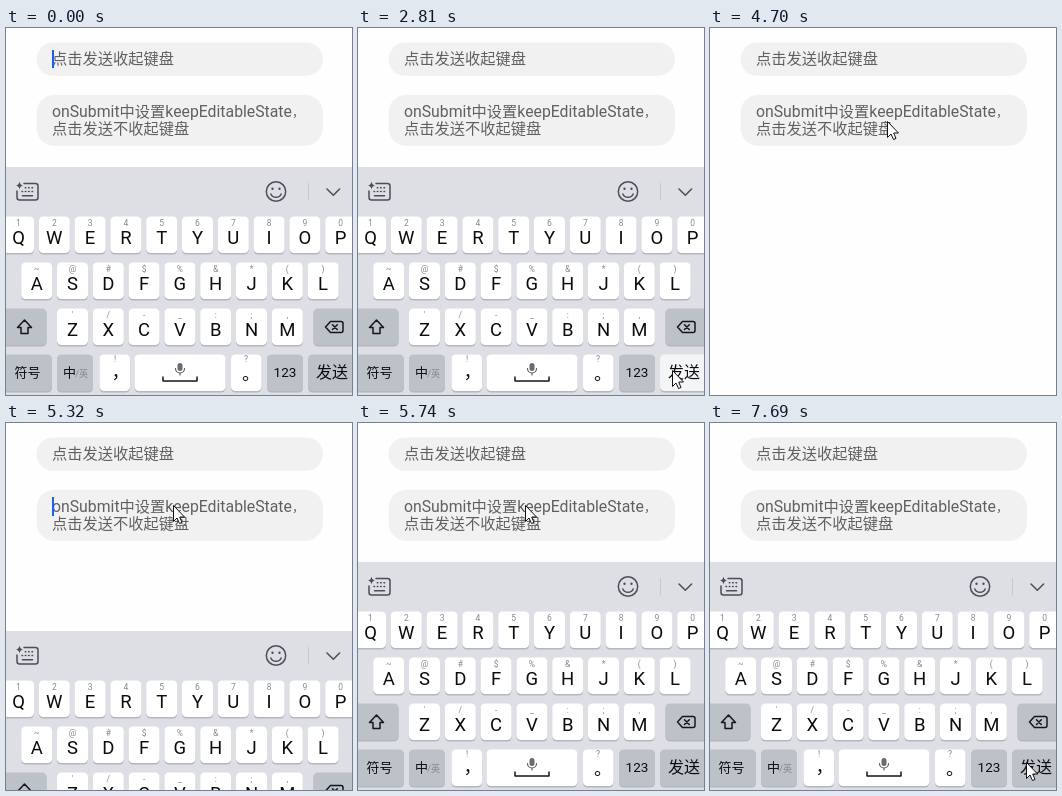
These frames come from a looping animation (346x367 px, 8 s). An HTML page:

```html
<!DOCTYPE html>
<html lang="zh-CN">
<head>
<meta charset="utf-8">
<title>Keyboard submit</title>
<style>
  html, body { margin: 0; width: 100%; height: 100%; overflow: hidden; background: #fefefe; }
  svg { display: block; width: 346px; height: 367px; }
  text { font-family: Roboto, "Noto Sans CJK SC", "Noto Sans CJK", sans-serif; fill: #0c0c0e; }
  .field { fill: #f1f1f1; }
  .hint { font-size: 15.25px; fill: #606060; }
  .latin { font-size: 15.8px; }
  .caret { fill: #1a5ff5; }
  .edge { fill: #b3b7bf; }
  .key { fill: #fff; }
  .dark { fill: #bdc1c8; }
  .pressed { fill: #f4f5f7; }
  .letter { font-size: 18.5px; text-anchor: middle; }
  .small { font-size: 8.5px; fill: #85888e; text-anchor: middle; }
  .word { font-size: 13px; font-weight: 500; text-anchor: middle; }
  .plain { font-weight: 400; }
  .line { fill: none; stroke: #4b4e54; stroke-width: 1.5; stroke-linecap: round; stroke-linejoin: round; }
  .ink { stroke: #16171a; }
</style>
</head>
<body>
<svg viewBox="0 0 346 367">
  <rect class="field" x="30.5" y="14.6" width="286.5" height="33.2" rx="16.6"/>
  <rect class="field" x="30.5" y="66.8" width="286.5" height="51" rx="18"/>
  <text class="hint" x="46" y="35.7">点击发送收起键盘</text>
  <text class="hint" x="46" y="88.5"><tspan class="latin">onSubmit</tspan>中设置<tspan class="latin">keepEditableState</tspan><tspan font-size="12">，</tspan></text>
  <text class="hint" x="46" y="105.7">点击发送不收起键盘</text>
  <rect class="caret" id="caret1" x="46" y="22" width="2" height="18"/>
  <rect class="caret" id="caret2" x="46" y="74" width="2" height="19"/>

  <g id="keyboard">
    <rect y="139" width="346" height="230" fill="#dddfe5"/>
    <g class="line">
      <path d="M18 155.5H29.5Q32 155.5 32 158V169.5Q32 172 29.5 172H13.5Q11 172 11 169.5V163"/>
      <path d="M16.5 167.7H26.5M16 163.5h.6M19.3 163.5h.6M22.6 163.5h.6M26 163.5h.6M19.3 159.7h.6M22.6 159.7h.6M26 159.7h.6"/>
      <path d="M13.5 153.5Q14 157 17 157.5Q14 158 13.5 161.5Q13 158 10 157.5Q13 157 13.5 153.5Z" fill="#4b4e54" stroke="none"/>
      <circle cx="270" cy="163.5" r="9.7"/>
      <path d="M264.8 166Q266.3 169.3 270 169.3T275.2 166"/>
      <path d="M266.5 160.5v.4M273.5 160.5v.4" stroke-width="2.2"/>
      <path d="M302.5 155.5V172" stroke="#c6c9d0" stroke-width="1"/>
      <path d="M321 161L327.3 167.3L333.6 161"/>
    </g>
    <g id="keys"></g>
    <g class="line ink">
      <path d="M18.5 292L25.5 299.5H22V305.5H15V299.5H11.5Z"/>
      <path d="M324.5 293.5H335Q337 293.5 337 295.5V302.5Q337 304.5 335 304.5H324.5L319.5 299Z"/>
      <path d="M326.5 296.7L331.3 301.5M331.3 296.7L326.5 301.5"/>
      <path d="M157 348.5V353H191V348.5" stroke-linecap="butt"/>
    </g>
    <rect x="171.5" y="335" width="5" height="8" rx="2.5" fill="#686b70"/>
    <path class="line" d="M169.5 340.5a4.5 4.5 0 0 0 9 0M174 345v2" style="stroke-width:1.1"/>
    <text class="word" x="21.5" y="349">符号</text>
    <text class="word" x="63.5" y="349">中</text>
    <text class="small" x="75.7" y="348.5" style="font-size:9px">/英</text>
    <text class="small" x="109" y="334">!</text>
    <text x="105.5" y="349.5" font-size="18">，</text>
    <text class="small" x="240" y="334">?</text>
    <text x="236" y="351.5" font-size="18">。</text>
    <text class="word plain" x="279" y="349" style="font-size:13.5px">123</text>
    <text class="word plain" x="326" y="350" style="font-size:16px">发送</text>
  </g>

  <path id="cursor" d="M.5 .5V16.5L4 13L6.5 18.5L9 17.5L6.7 12H11.5Z" fill="#fff" stroke="#111" stroke-linejoin="round"/>
</svg>
<script>
const LOOP = 8000, STEP = 69, PITCH = 35.8, KEYBOARD_H = 228;
const $ = id => document.getElementById(id);

const key = (x, y, w, cls = 'key', id = '') =>
  `<rect class="edge" x="${x}" y="${y + 1}" width="${w}" height="37" rx="4.5"/>
   <rect class="${cls}" ${id && `id="${id}"`} x="${x}" y="${y}" width="${w}" height="36.5" rx="4.5"/>`;

const esc = c => c === '&' ? '&amp;' : c;

// A row of letter keys, each with its small alternate character.
const row = (letters, marks, x0, y) => [...letters].map((c, i) => {
  const x = x0 + i * PITCH;
  return key(x - 15.5, y, 31) +
    `<text class="small" x="${x}" y="${y + 9}">${esc(marks[i])}</text>
     <text class="letter" x="${x}" y="${y + 27.5}">${c}</text>`;
}).join('');

$('keys').innerHTML =
  row('QWERTYUIOP', '1234567890', 12.5, 188.5) +
  row('ASDFGHJKL', '~@#$%&*()', 30.7, 234.5) +
  row('ZXCVBNM', "'/-_:;,", 66.5, 280.5) +
  key(-6, 280.5, 46.5, 'dark') + key(307.5, 280.5, 46, 'dark') +
  key(-6, 326.5, 52, 'dark') + key(51, 326.5, 36, 'dark') +
  key(93.5, 326.5, 30.5) + key(128.5, 326.5, 91) + key(225, 326.5, 30.5) +
  key(261, 326.5, 36, 'dark') + key(302, 326.5, 50, 'dark', 'send');

const within = (t, spans) => spans.some(([a, b]) => t >= a && t < b);
const smooth = p => p * p * (3 - 2 * p);
const linear = p => p;
const held = (t, start) => Math.floor((t - start) / STEP) * STEP;

// start, end, from, to, easing
const moves = [
  [601, 800, [306, 368], [314, 344], linear],
  [931, 1069, [314, 344], [314, 342], linear],
  [4000, 4694, [314, 342], [177, 93], smooth],
  [4694, 4900, [177, 93], [167, 82], linear],
  [6002, 6830, [167, 82], [312, 334], smooth],
  [6830, 7030, [312, 334], [316, 339], linear],
];

function cursorAt(t) {
  const [a, b, from, to, ease] = moves.filter(m => t >= m[0]).pop() || moves[0];
  const p = t < a ? 0 : t >= b ? 1 : ease(held(t, a) / (b - a));
  return from.map((v, i) => Math.round(v + (to[i] - v) * p));
}

// Drops out quickly, then returns as a critically damped spring.
function keyboardDrop(t) {
  if (t < 2880 || t >= 5740) return 0;
  if (t < 3020) return KEYBOARD_H * (t < 2950 ? 0.3 : 0.8);
  if (t < 5120) return KEYBOARD_H + 2;
  const u = 0.0117 * held(t, 5113);
  return Math.round(KEYBOARD_H * (1 + u) * Math.exp(-u));
}

const show = (id, on) => $(id).setAttribute('visibility', on ? 'visible' : 'hidden');

function draw(t) {
  show('caret1', within(t, [[0, 530], [1000, 1550], [2010, 2540]]));
  show('caret2', within(t, [[5190, 5740], [6210, 6720], [7230, 7690]]));
  $('send').setAttribute('class', within(t, [[2740, 2950]]) ? 'pressed' : 'dark');
  $('keyboard').setAttribute('transform', `translate(0 ${keyboardDrop(t)})`);
  $('cursor').setAttribute('transform', `translate(${cursorAt(t)})`);
}

const start = performance.now();
function tick() {
  draw((performance.now() - start) % LOOP);
  requestAnimationFrame(tick);
}
tick();
</script>
</body>
</html>
```
